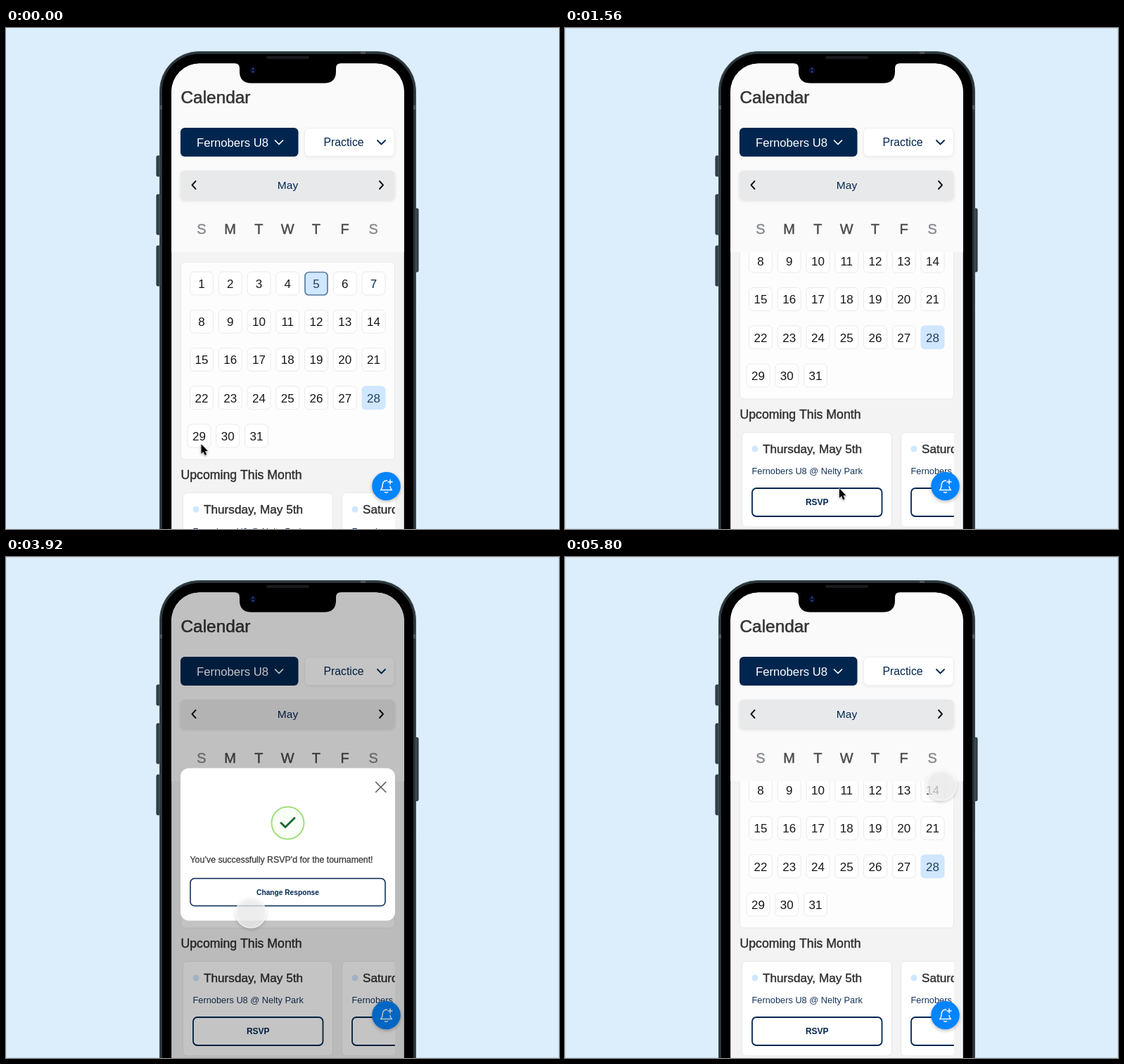
Recreate the animation shown at these times as an HTML page with a canvas. Size 786x713 px, loop 5920 ms.

```html
<!DOCTYPE html>
<html lang="en">
<head>
<meta charset="utf-8">
<title>Calendar RSVP</title>
<style>
  html, body { margin: 0; width: 100%; height: 100%; overflow: hidden; background: #dceefb; }
  canvas { display: block; }
</style>
</head>
<body>
<canvas id="stage" width="786" height="713"></canvas>
<script>
const stage = document.getElementById('stage').getContext('2d');
const layer = new OffscreenCanvas(786, 713).getContext('2d');
let ctx = stage;

const LOOP = 5920;
const NAVY = '#00264f', INK = '#2d2d2f', PALE = '#cfe7ff', EDGE = '#e6e7e9';
const TEAM = 'Fernobers U8', PARK = 'Nelty Park';

// Pointer stops: time, x, y
const POINTER = [
  [40, 277, 591.5], [440, 370, 592], [452, 370, 592], [760, 364, 508], [920, 364, 508],
  [1080, 362.5, 511.5], [1440, 362.5, 511.5], [1560, 389.5, 654.5], [2000, 374.5, 664.5],
  [2800, 374.5, 664.5], [3020, 440, 570], [3320, 348, 506.5], [4700, 348, 506.5],
  [4760, 355, 499], [5040, 556, 345], [5280, 535, 325]
];
const PRESSES = [[452, 1280], [2000, 2800], [3680, 4760], [5520, LOOP]];

const progress = (t, start, end) => Math.min(1, Math.max(0, (t - start) / (end - start)));
const easeOut = (p, power) => 1 - (1 - p) ** power;

function pointerAt(t) {
  const next = POINTER.findIndex(stop => stop[0] > t);
  if (next === 0) return POINTER[0].slice(1);
  if (next < 0) return POINTER.at(-1).slice(1);
  const [t0, x0, y0] = POINTER[next - 1], [t1, x1, y1] = POINTER[next];
  const k = easeOut(progress(t, t0, t1), 2);
  return [x0 + (x1 - x0) * k, y0 + (y1 - y0) * k];
}

function paint(fill, stroke, width = 1) {
  if (fill) { ctx.fillStyle = fill; ctx.fill(); }
  if (stroke) { ctx.strokeStyle = stroke; ctx.lineWidth = width; ctx.stroke(); }
}

function box(x, y, w, h, r, fill, stroke, width) {
  ctx.beginPath();
  ctx.roundRect(x, y, w, h, r);
  paint(fill, stroke, width);
}

function disc(x, y, r, fill, stroke, width) {
  ctx.beginPath();
  ctx.arc(x, y, r, 0, Math.PI * 2);
  paint(fill, stroke, width);
}

function path(d, x, y, fill, stroke, width) {
  const shape = new Path2D(d);
  ctx.save();
  ctx.translate(x, y);
  ctx.lineCap = ctx.lineJoin = 'round';
  if (stroke) { ctx.strokeStyle = stroke; ctx.lineWidth = width; ctx.stroke(shape); }
  if (fill) { ctx.fillStyle = fill; ctx.fill(shape); }
  ctx.restore();
}

function withShadow(color, blur, dy, draw) {
  ctx.save();
  ctx.shadowColor = color;
  ctx.shadowBlur = blur;
  ctx.shadowOffsetY = dy;
  draw();
  ctx.restore();
}

// "medium" thickens the regular face with a hairline stroke
function text(s, x, y, size, color = INK, { weight = 'normal', align = 'left', spacing = 0 } = {}) {
  const medium = weight === 'medium';
  ctx.font = `${medium ? 'normal' : weight} ${size}px "Liberation Sans", Arial, sans-serif`;
  ctx.textAlign = align;
  ctx.letterSpacing = spacing + 'px';
  ctx.fillStyle = color;
  ctx.fillText(s, x, y);
  if (medium) {
    ctx.strokeStyle = color;
    ctx.lineWidth = size / 45;
    ctx.lineJoin = 'round';
    ctx.strokeText(s, x, y);
  }
}
const MEDIUM = { weight: 'medium' };
const CENTER = { align: 'center' };
const BOLD_CENTER = { weight: 'bold', align: 'center' };

function outlineButton(label, x, y, w, h, size, width) {
  box(x, y, w, h, 6, '#fff', NAVY, width);
  text(label, x + w / 2, y + h / 2 + size * 0.36, size, NAVY, BOLD_CENTER);
}

function phoneBody() {
  for (const [x, y, h] of [[214, 182, 29], [214, 237, 57], [214, 310, 57], [581, 257, 90]])
    box(x, y, 5, h, 1.5, '#35424a', '#222c32');
  box(218.5, 33.5, 364, 800, 56, '#2a353b', '#475359');
  box(222, 37, 357, 800, 52, '#000');
  ctx.fillStyle = '#4d575c';
  ctx.fillRect(504, 33, 7, 4);
  ctx.fillRect(218, 110, 4, 6);
  ctx.fillRect(579, 110, 4, 6);
  box(370, 40, 61, 4, 2, '#191a1c');
}

function notch() {
  path('M325 50 Q332 50.5 332 57 V62 Q332 78.5 349 78.5 H452 Q469 78.5 469 62 V57 Q469 50.5 476 50 Z', 0, 0, '#000');
  disc(351, 60, 4.5, '#0a1028');
  disc(351, 57.8, 1.3, '#25409a');
  disc(351, 62.2, 1.3, '#25409a');
}

function header() {
  ctx.fillStyle = '#fafafa';
  ctx.fillRect(235, 50, 331, 269);
  text('Calendar', 248.5, 106.5, 24.4, '#333', MEDIUM);

  box(248, 142, 167.5, 41, 6, NAVY);
  text(TEAM, 271, 168.5, 16.7, '#fff');
  path('M0 0 L5.5 5.5 L11 0', 382.5, 160, null, '#fff', 1.7);

  withShadow('#0000000f', 5, 2, () => box(424.5, 142.5, 127.5, 40, 6, '#fff'));
  box(424.5, 142.5, 127.5, 40, 6, null, '#ededef');
  text('Practice', 451.5, 168, 15.8, NAVY);
  path('M0 0 L5.5 5.5 L11 0', 528, 160, null, NAVY, 1.8);

  withShadow('#0000001c', 5, 2, () => box(248, 203, 304.5, 41, 6, '#e8e9ea'));
  text('May', 400.5, 229, 15.5, NAVY, CENTER);
  path('M5 0 L0 5.5 L5 11', 264.5, 218, null, '#111', 1.9);
  path('M0 0 L5 5.5 L0 11', 531, 218, null, '#111', 1.9);

  [...'SMTWTFS'].forEach((day, i) =>
    text(day, 278 + i * 40.7, 293, 20, i % 6 ? '#4a4a4c' : '#85898f', { weight: 'medium', align: 'center' }));
}

function dateCell(day) {
  const col = (day - 1) % 7, row = Math.floor((day - 1) / 7);
  const x = 278 + col * 40.75 - (row === 4 ? 3.5 : 0), y = 363.5 + row * 54.25;
  if (day === 5) box(x - 16, y - 16, 32, 32.5, 5.5, PALE, '#5a7a9e', 1.7);
  else if (day === 28) box(x - 17, y - 17, 34, 34, 6, PALE);
  else box(x - 16.5, y - 16.5, 33, 33, 6, '#fff', '#e9eaec');
  const color = day === 7 ? NAVY : day === 28 || day === 5 ? '#24405c' : '#161616';
  text(String(day), x, y + 6.3, 17, color, CENTER);
}

function eventCard(x, title) {
  box(x, 661.5, 213, 134.5, 6, '#fff', EDGE);
  disc(x + 18.5, 685, 4.5, PALE);
  text(title, x + 29.5, 690.5, 17.2, INK, MEDIUM);
  text(`${TEAM} @ ${PARK}`, x + 14, 720.5, 12.8, '#17345a');
  outlineButton('RSVP', x + 14.5, 741, 184.5, 40, 12, 1.8);
}

function scrollArea(scroll) {
  ctx.save();
  ctx.beginPath();
  ctx.rect(248, 319, 304.8, 394);
  ctx.clip();
  ctx.translate(0, -scroll);
  box(248.5, 333, 304, 281, 6, '#fdfdfd', EDGE);
  for (let day = 1; day <= 31; day++) dateCell(day);
  text('Upcoming This Month', 248.5, 642, 17.7, INK, MEDIUM);
  eventCard(251.5, 'Thursday, May 5th');
  eventCard(477.5, 'Saturday, May 28th');
  ctx.restore();
}

function bellButton() {
  withShadow('#00000044', 5, 2, () => disc(540.5, 652, 20.3, '#0084ff'));
  path('M1 -8 C-4 -8 -5.5 -4 -5.5 0 C-5.5 3 -6.5 4 -8 5.5 H8 C6.5 4 5.5 3 5.5 0.5 M-2 8.5 Q0 10 2 8.5 M5.5 -9 V-3 M2.5 -6 H8.5',
    540.5, 652, null, '#fff', 1.5);
}

function modalCard(y, h) {
  box(248, y, 305, h, 12, '#fff');
  path('M-7 -7 L7 7 M7 -7 L-7 7', 532.7, y + 27, null, '#5c5c5e', 1.7);
}

const check = (x, y) => path('M-9.5 0.5 L-3.5 6.5 L9.5 -6.5', x, y, null, '#1d6b2f', 3);

function inviteModal() {
  modalCard(214.5, 388);
  text('Thursday, May 5th', 261.5, 281.5, 13.5, '#6c6c6e');
  text(PARK + ' Tournament', 261.5, 315.5, 24.5, '#3a3a3c', MEDIUM);
  text('Time', 261.5, 362, 15.6, '#3a3a3c', MEDIUM);
  text('Location', 261.5, 406, 15.8, '#3a3a3c', MEDIUM);
  text('Attending?', 261.5, 451, 15.8, '#3a3a3c', MEDIUM);

  const chip = { spacing: 0.4 };
  box(396.5, 341, 143, 30, 6, '#f4f4f5');
  text('5:30 PM', 402.5, 361.5, 14, '#69696b', chip);
  text('-', 465.5, 361.5, 14, '#69696b', chip);
  text('7:30 PM', 477.5, 361.5, 14, '#69696b', chip);
  box(421.5, 385.5, 118, 29.5, 6, '#f4f4f5');
  text('Home Fields', 428, 405.5, 14, '#69696b', chip);
  path('M-1.5 -6 H-4.5 Q-6 -6 -6 -4.5 V4.5 Q-6 6 -4.5 6 H4.5 Q6 6 6 4.5 V2 M2 -6 H6 V-2 M6 -6 L-1.5 1.5',
    525, 400, null, NAVY, 1.8);

  box(262, 475.5, 134.5, 46, 6, '#f9fef7', '#bce8a2', 1.7);
  check(329, 498);
  box(404.5, 475.5, 134.5, 46, 6, '#fff8f7', '#efa3a3', 1.7);
  path('M-8 -8 L8 8 M8 -8 L-8 8', 471.8, 498.5, null, '#bf2327', 3.3);
  outlineButton('Remind Me Later', 262, 543, 277, 39, 10.3, 1.5);
}

function successModal() {
  modalCard(300.5, 217);
  disc(400.5, 378.5, 23, '#f9fef7', '#a0df7c', 2);
  check(400.5, 378);
  text('You’ve successfully RSVP’d for the tournament!', 261.5, 434.5, 12.3, '#3a3a3c', MEDIUM);
  outlineButton('Change Response', 262, 457.5, 277, 39, 10.2, 1.5);
}

// Draws on a separate layer so that the group fades as one
function faded(alpha, draw) {
  if (alpha <= 0) return;
  layer.clearRect(0, 0, 786, 713);
  ctx = layer;
  draw();
  ctx = stage;
  ctx.globalAlpha = alpha;
  ctx.drawImage(layer.canvas, 0, 0);
  ctx.globalAlpha = 1;
}

function pointer(t) {
  const [x, y] = pointerAt(t);
  if (PRESSES.some(([from, to]) => t >= from && t < to)) {
    withShadow('#00000040', 5, 2, () => disc(x, y, 21.7, 'rgba(248,248,248,.72)'));
    disc(x, y, 21.5, null, 'rgba(255,255,255,.65)', 1.2);
  } else {
    withShadow('#00000044', 3, 1, () =>
      path('M0 0 V13.5 L3 10.7 L5.3 15.8 L7.6 14.8 L5.4 9.8 H9.4 Z', x + 0.5, y + 0.8, '#000', '#fff', 1.2));
  }
}

function render(t) {
  const scroll = 86 * easeOut(progress(t, 452, 760), 2);
  const opened = easeOut(progress(t, 2170, 2440), 4);
  const answered = easeOut(progress(t, 3640, 3920), 4);
  const open = 1 - easeOut(progress(t, 5650, 5800), 2);

  ctx.fillStyle = '#dceefb';
  ctx.fillRect(0, 0, 786, 713);
  if (t >= 920) {
    ctx.strokeStyle = '#c9dce9';
    ctx.lineWidth = 1;
    ctx.strokeRect(0.5, 0.5, 785, 712);
  }
  phoneBody();

  ctx.save();
  ctx.beginPath();
  ctx.roundRect(235.2, 50.5, 330.6, 800, 40);
  ctx.clip();
  ctx.fillStyle = '#f3f3f4';
  ctx.fillRect(235, 50, 331, 663);
  header();
  scrollArea(scroll);
  bellButton();
  ctx.fillStyle = `rgba(0,0,0,${0.23 * opened * open})`;
  ctx.fillRect(235, 50, 331, 663);
  faded(opened * (1 - answered), inviteModal);
  faded(answered * open, successModal);
  ctx.restore();

  notch();
  pointer(t);
}

function frame() {
  render(performance.now() % LOOP);
  requestAnimationFrame(frame);
}
frame();
</script>
</body>
</html>
```
